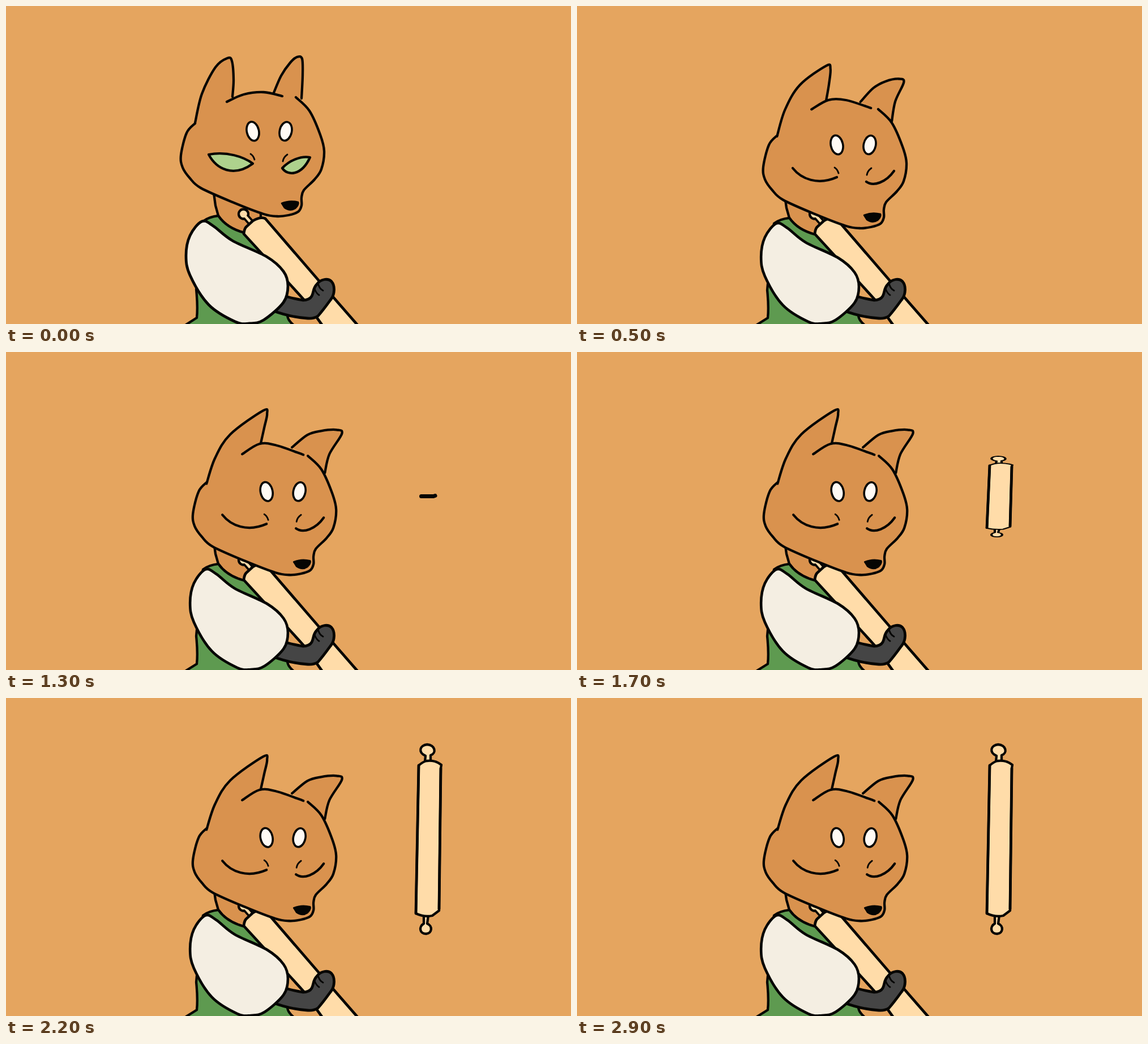
Animation of 998x561 px, one loop 3000 ms. Source, as an HTML page:

```html
<!DOCTYPE html>
<html lang="en">
<head>
<meta charset="utf-8">
<title>Fox with a rolling pin</title>
<style>
  html, body { margin: 0; width: 100%; height: 100%; overflow: hidden; background: #e5a55f; }
  svg { display: block; width: 100vw; height: 100vh; }
  path, ellipse, circle { stroke: #050503; stroke-width: 4.3; stroke-linecap: round; stroke-linejoin: round; fill: none; }
  .fur { fill: #d9924e; }
  .cloth { fill: #5e9a50; }
  .sleeve { fill: #f4eee2; }
  .glove { fill: #454545; }
  .wood { fill: #ffdca9; }
  .eye { fill: #aed28d; }
  .spot { fill: #fffaf4; stroke-width: 3.6; }
  .nose { fill: #050503; stroke-width: 2.5; }
  .fine { stroke-width: 2.8; }
  .bold { stroke-width: 4.8; }
  #skin { stroke: none; }
</style>
</head>
<body>
<svg viewBox="0 0 998 561" preserveAspectRatio="none">
  <g id="torso">
    <path class="fur" d="M367 330L370 352L375 370Q390 392 421 400L450 385V350Z"/>
    <path class="cloth" d="M348 380Q358 372 375 370Q390 392 421 400L458 440L495 520L497 546Q498 556 512 566H312L337 550Q339 530 336 500L345 400Z"/>
  </g>
  <path d="M422 370L436 386" style="stroke-width:12"/>
  <circle class="wood" cx="419.500" cy="367" r="8.500"/>
  <path d="M422 370L436 386" style="stroke:#ffdca9;stroke-width:4.500"/>
  <path class="wood bold" d="M560 565L527 519L497 486L420 402Q421 393 424 390L436 379Q450 371 458 375L553 485L622 564"/>
  <path class="glove bold" d="M470 505L497 513Q512 517 524 519Q536 519 540 512C544 504 542 498 549 491C556 481 569 480 575 486C582 494 580 509 575 516C567 527 560 537 551 547Q543 552 533 551Q502 549 470 537Z"/>
  <path class="fine" d="M545 498Q547 506 553 510M552 492Q554 499 560 502"/>
  <path id="sleeve" class="sleeve bold"/>
  <g id="head">
    <path id="skin" class="fur"/>
    <path id="lines"/>
    <path class="nose" d="M487 348Q501 342 516 346Q518 350 511 357Q502 363 492 356Z"/>
    <g id="features">
      <ellipse class="spot" rx="10.700" ry="17" transform="translate(436 221) rotate(-12)"/>
      <ellipse class="spot" rx="10.700" ry="16.700" transform="translate(494 221) rotate(12)"/>
      <path class="fine" d="M432 261Q437 264 439 271M489 274Q490 267 497 262"/>
      <path id="eyeL" class="eye"/>
      <path id="eyeR" class="eye"/>
    </g>
  </g>
  <path id="dash" style="stroke-width:7"/>
  <g id="pin">
    <path class="wood" d="M740 112L741 102C727 96 731 83 744 82C758 83 761 97 750 101L750 112"/>
    <path class="wood" d="M738 383L738 398C729 403 730 416 742 416C753 415 754 402 744 398L746 383"/>
    <path class="wood" d="M729 119Q737 112 743 111Q758 109 769 118L768 124L765 367V375L753 384Q738 387 724 380Z"/>
    <path class="bold" d="M729 119L724 380M768 124L765 372"/>
  </g>
</svg>
<script>
const LOOP = 3000, STEP = 100;
const $ = id => document.getElementById(id);
const set = (id, d) => $(id).setAttribute("d", d);
const move = (id, transform) => $(id).setAttribute("transform", transform);
const points = s => s.split(" ").map(p => p.split(",").map(Number));
const mix = (a, b, k) => a.map((p, i) => p.map((v, j) => v + (b[i][j] - v) * k));
const smooth = k => k * k * (3 - 2 * k);

// Smooth curve through key points.
function curve(pts, closed) {
  const n = pts.length;
  const at = i => closed ? pts[(i + n) % n] : pts[Math.max(0, Math.min(n - 1, i))];
  let d = "M" + pts[0];
  for (let i = 0; i < (closed ? n : n - 1); i++) {
    const [a, b, c, e] = [at(i - 1), at(i), at(i + 1), at(i + 2)];
    const p = b.map((v, j) => v + (c[j] - a[j]) / 6);
    const q = c.map((v, j) => v - (e[j] - b[j]) / 6);
    d += `C${p} ${q} ${c}`;
  }
  return d + (closed ? "Z" : "");
}

const face = points("512,161 536,185 555,227 562,256 557,288 545,306 526,325 522,338 522,352 516,363 499,369 479,371 455,367 400,346 344,321 325,304 312,285 309,263 319,224 334,207");
const sleeve = points("346,380 366,388 400,414 460,442 490,468 498,494 490,523 455,554 430,560 405,557 358,527 325,475 318,440 325,405");

// Upright and flopped, relative to the head.
const earL = ["334,206 346,155 370,108 391,92 399,97 402,130 400,160",
              "333,210 348,165 375,123 433,81 440,87 435,111 429,138"].map(points);
const crown = ["390,169 420,156 455,152 488,159",
               "396,158 426,140 455,142 504,159"].map(points);
const earR = ["473,153 486,123 502,100 514,90 523,93 524,122 522,163",
              "484,146 511,124 535,117 563,115 572,122 550,158 542,191"].map(points);

// Eye corners and the bend of each lid, open and shut.
const eyes = {
  eyeL: { ends: "358,262 436,278", upper: "390,256 420,266", lower: "372,288 402,303", shut: "373,281 402,293" },
  eyeR: { ends: "488,286 537,267", upper: "500,273 520,264", lower: "497,300 522,300", shut: "501,295 523,287" }
};

function drawEye(id, blink) {
  const { ends, upper, lower, shut } = eyes[id];
  const [from, to] = points(ends);
  const bend = lid => mix(points(lid), points(shut), blink);
  const [a, b] = bend(upper), [c, d] = bend(lower);
  set(id, `M${from}C${a} ${b} ${to}C${d} ${c} ${from}Z`);
}

function drawFox(step) {
  const settled = step > 5;
  const ease = smooth(Math.min(1, step / 5));
  const nod = settled ? 1.06 : ease;
  const flop = settled ? 1 : ease * .7;

  const outline = [mix(...earL, flop), mix(...crown, flop), mix(...earR, flop), face].map(p => curve(p)).join("");
  set("lines", outline);
  set("skin", outline.replace(/(?!^)M/g, "L") + "Z");
  move("head", `translate(${20 * nod} ${21 * nod})`);
  move("features", `translate(${3 * ease} ${3 * ease})`);
  drawEye("eyeL", ease);
  drawEye("eyeR", ease);

  // The body sinks a little with the nod.
  const shrink = (x, y) => `translate(497 560) scale(${1 - x * ease} ${1 - y * ease}) translate(-497 -560)`;
  move("torso", shrink(0, .02));
  move("sleeve", shrink(.04, .02));
}

function drawPin(step) {
  const size = step < 19 ? Math.min(.426, .12 + .102 * (step - 14)) : Math.min(1, .43 + .27 * (step - 18));
  $("pin").style.display = step < 14 ? "none" : "";
  move("pin", `translate(0 ${249 + 10.5 * (1 - size)}) scale(1 ${size}) translate(0 -249)`);
  const end = step === 12 ? 746 : 758;
  set("dash", step === 12 || step === 13 ? `M733.500 254.500H${end - 3}L${end} 253.500` : "");
}

set("sleeve", curve(sleeve, true));
const start = performance.now();
let shown = -1;
function tick() {
  const step = Math.floor((performance.now() - start) % LOOP / STEP);
  if (step !== shown) {
    shown = step;
    drawFox(step);
    drawPin(step);
  }
  requestAnimationFrame(tick);
}
tick();
</script>
</body>
</html>
```
